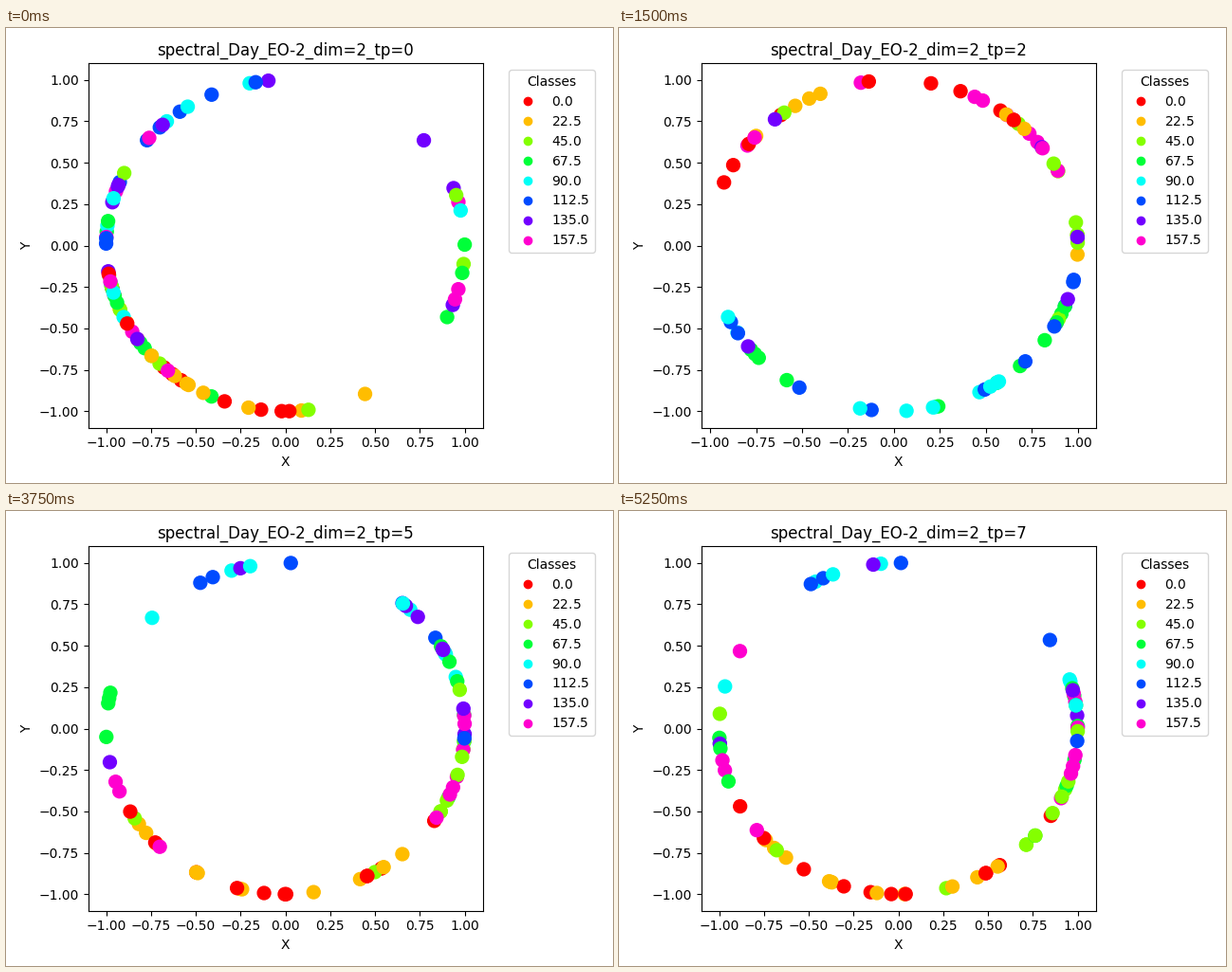
A matplotlib script for the animation above (6000 ms loop, 640 px wide and 480 px high).

```python
import numpy as np
import matplotlib.pyplot as plt
from matplotlib.animation import FuncAnimation

STEPS = 8
CLASSES = 8
PER_CLASS = 11

# Key poses of the ring, interpolated over the steps between them:
# lift and swing of a class along the ring (degrees), class at the top,
# spread (degrees), share on the left side, two empty arcs (degrees).
KEYS = [0, 1, 2, 3, 7]
POSES = np.array([
    [-15, 45, 5.0, 30, 0.80, 42, 79, 303, 328],
    [-5, 55, 0.3, 26, 0.50, 0, 25, 252, 286],
    [0, 55, 0.0, 22, 0.45, 14, 26, 161, 198],
    [0, 60, 4.4, 22, 0.50, 72, 90, 150, 171],
    [-8, 62, 4.9, 22, 0.50, 33, 86, 138, 152],
])

rng = np.random.default_rng(4)
classes = rng.permutation(np.repeat(np.arange(CLASSES), PER_CLASS))
noise = rng.normal(size=classes.size)
side = rng.random(classes.size)

fig, ax = plt.subplots(figsize=(6.4, 4.8), dpi=100)


def on_circle(theta):
    return np.cos(np.radians(theta)), np.sin(np.radians(theta))


def draw(tp):
    pose = [np.interp(tp, KEYS, column) for column in POSES.T]
    lift, swing, top, spread, left, *gaps = pose

    def is_open(theta):
        a, b, c, d = gaps
        return ~(((theta > a) & (theta < b)) | ((theta > c) & (theta < d)))

    # Opposite classes sit at the top and bottom, mirrored left and right.
    angle = lift + swing * np.cos(2 * np.pi * (classes - top) / CLASSES)
    angle = angle + spread * noise
    theta = np.where(side < left, 180 - angle, angle) % 360
    shown = is_open(theta)

    ax.clear()
    dots = ax.scatter(*on_circle(theta[shown]), c=22.5 * classes[shown], s=100,
                      cmap="hsv", vmin=0, vmax=180)
    # The limits follow the whole open ring.
    ring = np.arange(0, 360, 0.5)
    ax.update_datalim(np.column_stack(on_circle(ring[is_open(ring)])))
    ax.autoscale_view()
    ax.legend(*dots.legend_elements(), title="Classes",
              bbox_to_anchor=(1.05, 1), loc="upper left")
    ax.set_title(f"spectral_Day_EO-2_dim=2_tp={tp}")
    ax.set_xlabel("X")
    ax.set_ylabel("Y")


draw(0)
fig.tight_layout()
anim = FuncAnimation(fig, draw, frames=STEPS, interval=750, repeat=True)
plt.show()
```
